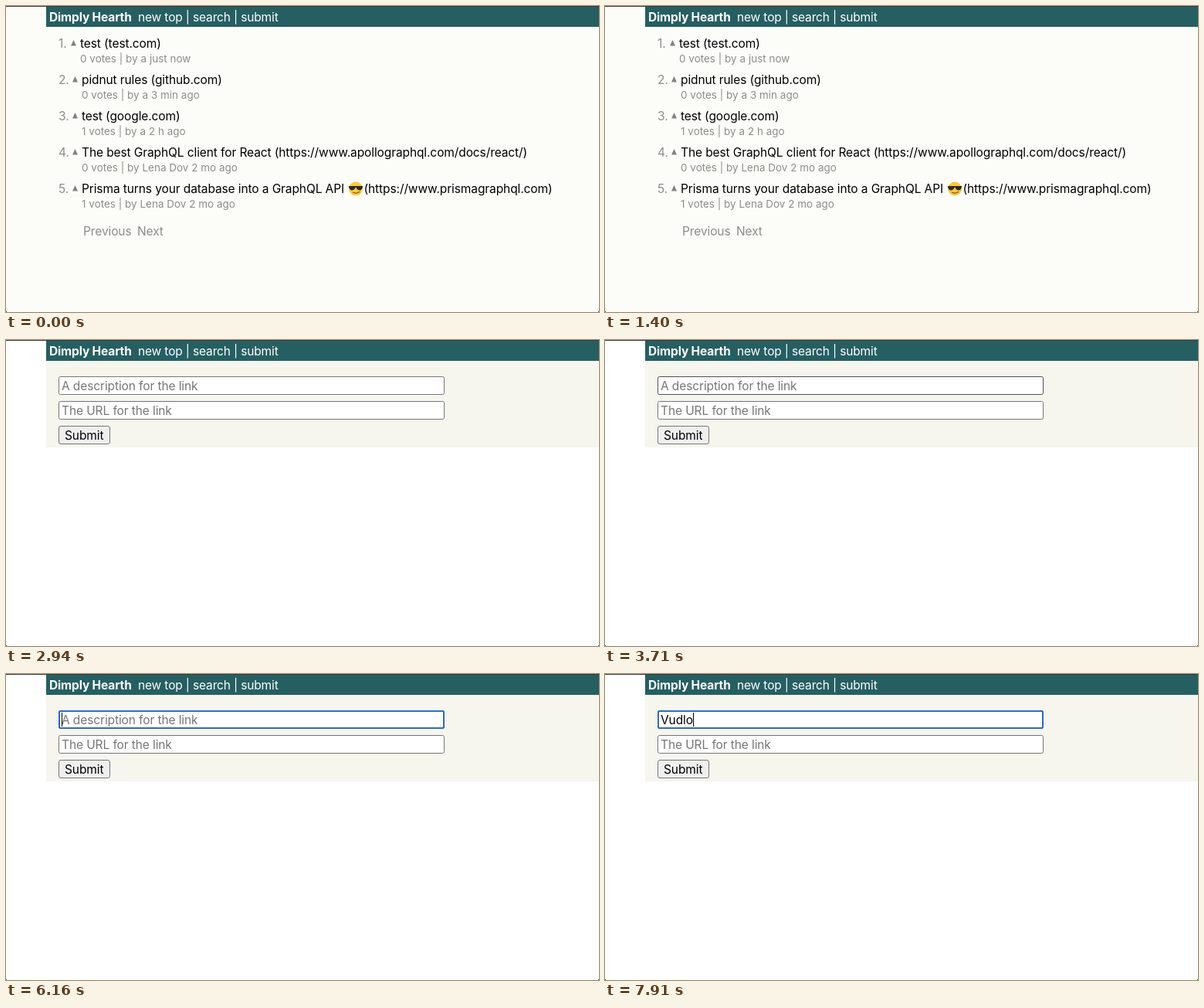
Recreate the animation shown at these times as an HTML page. Size 768 by 396 pixels, loop 8000 ms.

```html
<!DOCTYPE html>
<html lang="en">
<head>
<meta charset="utf-8">
<title>Link list</title>
<style>
  html, body { margin: 0; width: 768px; height: 396px; overflow: hidden; background: #fff; }
  svg { display: block; }
  text { font: 15.5px Inter, sans-serif; letter-spacing: -.1px; white-space: pre; }
  .bar { fill: #fff; letter-spacing: -.15px; }
  .bold { font-weight: 700; }
  .muted { fill: #8c8c8a; }
  .small { font-size: 13.4px; letter-spacing: .05px; }
  .hint { fill: #757575; }
  .field { fill: #fff; stroke: #767676; }
</style>
</head>
<body>
<svg width="768" height="396" viewBox="0 0 768 396">
  <g id="list">
    <rect width="768" height="396" fill="#fcfdf8"/>
    <g id="rows"></g>
    <g transform="translate(453 236.5)">
      <circle r="9" fill="#fbc93d"/>
      <path d="M-9-3.500H9V-2L7.500 1Q4.500 3 1.500.5L.7-1.500H-.7L-1.500.5Q-4.500 3-7.500 1L-9-2Z" fill="#2b2b2b"/>
      <path d="M-4 4.500Q1 7 5 3.800" fill="none" stroke="#8a5a1c" stroke-width="1.200"/>
    </g>
    <text x="463.5" y="242">(https://www.prismagraphql.com)</text>
    <text class="muted" x="100" y="297">Previous</text>
    <text class="muted" x="170" y="297">Next</text>
  </g>

  <g id="form">
    <rect width="768" height="396" fill="#fff"/>
    <rect x="52" y="27" width="716" height="112" fill="#f6f6ef"/>
    <rect id="title" class="field" x="68.5" y="47.5" width="499" height="23" rx="2"/>
    <rect id="ring" x="69" y="48" width="498" height="22" rx="2" fill="#fff" stroke="#2f6cbd" stroke-width="2"/>
    <text id="hint" class="hint" x="72" y="65">A description for the link</text>
    <text id="typed" x="72" y="65"></text>
    <rect id="caret" y="50" width="1" height="18"/>
    <rect class="field" x="68.5" y="79.5" width="499" height="23" rx="2"/>
    <text class="hint" x="72" y="97">The URL for the link</text>
    <rect x="68.5" y="111.5" width="66" height="23" rx="2.500" fill="#efefef" stroke="#767676"/>
    <text x="76" y="129">Submit</text>
  </g>

  <rect x="52" width="716" height="27" fill="#265f62"/>
  <text class="bar bold" x="56" y="20">Dimply Hearth</text>
  <text class="bar" x="171" y="20">new top | search | submit</text>
  <path d="M0 0H768V1H0ZM0 395h1v1h-1ZM767 395h1v1h-1Z" fill="#383838"/>
</svg>
<script>
const LOOP = 8000, FORM_AT = 2940, HOVER_AT = 3710, FOCUS_AT = 4340;
const WORD = 'Vudlo';
const KEY_TIMES = [6860, 7560, 7700, 7770, 7910];
const CARET_ON = [[4340, 4480], [4970, 5530], [6160, 6720], [6860, 7490], [7560, LOOP]];

// title, details, text x
const links = [
  ['test (test.com)', '0 votes | by a just now', 96],
  ['pidnut rules (github.com)', '0 votes | by a 3 min ago', 98],
  ['test (google.com)', '1 votes | by a 2 h ago', 98],
  ['The best GraphQL client for React (https://www.apollographql.com/docs/react/)',
    '0 votes | by Lena Dov 2 mo ago', 98],
  ['Prisma turns your database into a GraphQL API', '1 votes | by Lena Dov 2 mo ago', 98]
];

const $ = id => document.getElementById(id);
const show = (id, on) => { $(id).style.display = on ? '' : 'none'; };

$('rows').innerHTML = links.map(([title, details, x], i) => {
  const y = 54 + 47 * i, arrow = i ? 89.5 : 87.5;
  return `<text class="muted" x="68" y="${y}">${i + 1}.</text>
    <path d="M${arrow} ${y - 10}l3.500 7.500h-7Z" fill="#828282"/>
    <text x="${x}" y="${y}">${title}</text>
    <text class="muted small" x="${x}" y="${y + 19}">${details}</text>`;
}).join('');

function draw(t) {
  const count = KEY_TIMES.filter(k => t >= k).length;
  show('list', t < FORM_AT);
  show('form', t >= FORM_AT);
  show('ring', t >= FOCUS_AT);
  show('hint', !count);
  show('caret', CARET_ON.some(([from, to]) => t >= from && t < to));
  $('title').style.stroke = t >= HOVER_AT ? '#4f4f4f' : '';
  $('typed').textContent = WORD.slice(0, count);
  $('caret').setAttribute('x', 72 + (count ? Math.round($('typed').getComputedTextLength()) : 0));
}

const start = performance.now();
function tick() {
  draw((performance.now() - start) % LOOP);
  requestAnimationFrame(tick);
}
tick();
</script>
</body>
</html>
```
